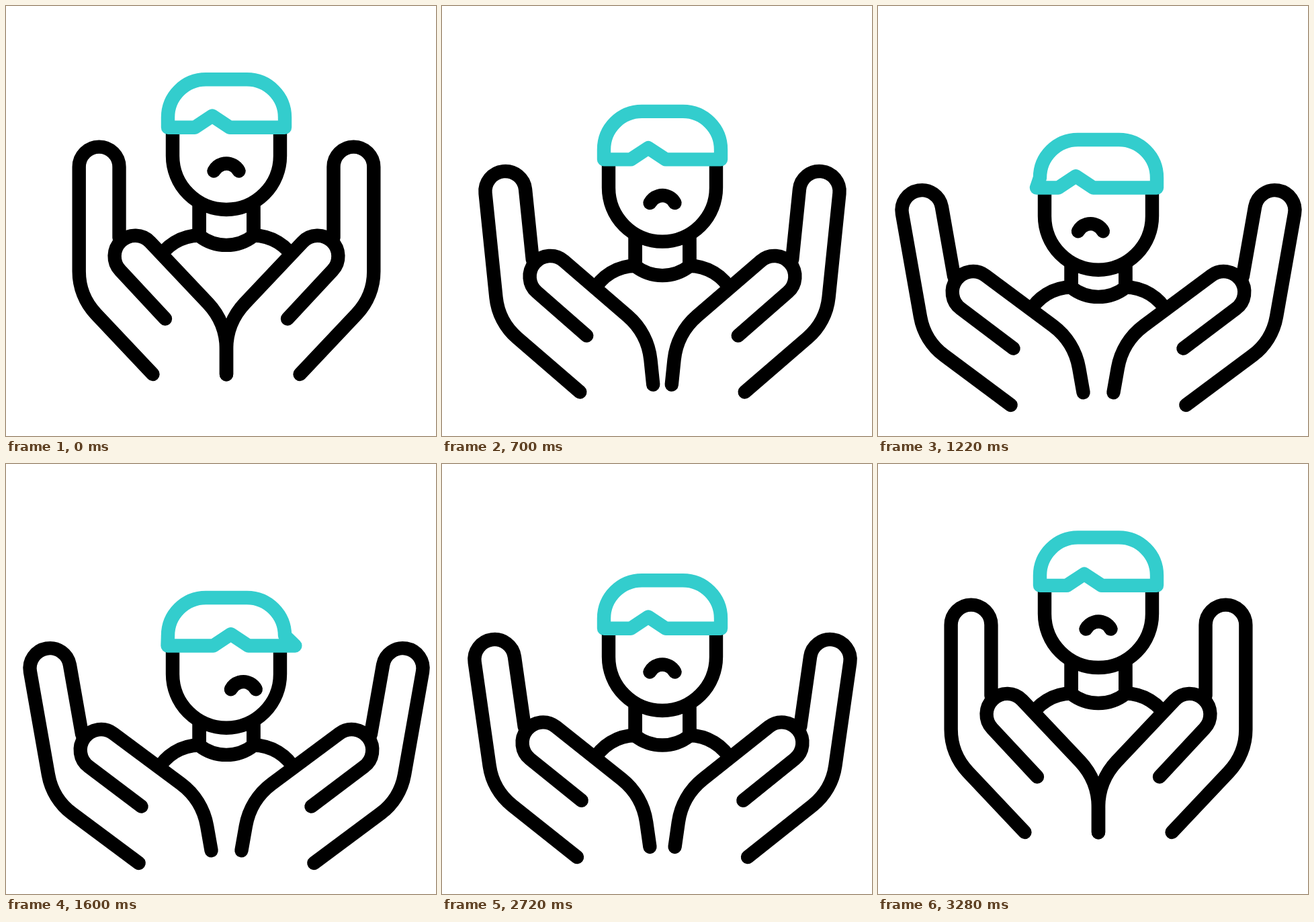
Animation of 640x640 px, one loop 3.62 s. Source, as an HTML page with a canvas:

```html
<!DOCTYPE html>
<html lang="en">
<head>
<meta charset="utf-8">
<title>Caring hands</title>
<style>
  html, body { margin: 0; width: 100%; height: 100%; overflow: hidden; background: #fff; }
  canvas { display: block; width: 100%; height: 100%; }
</style>
</head>
<body>
<canvas id="stage" width="640" height="640"></canvas>
<script>
const ctx = document.getElementById('stage').getContext('2d');
const LOOP = 3620, STEP = 20, MID = 328;
const BLACK = '#000', TEAL = '#33cdcd';
const TAU = Math.PI * 2;

const ease = (t, from, to) => {
  const u = Math.min(1, Math.max(0, (t - from) / (to - from)));
  return (1 - Math.cos(Math.PI * u)) / 2;
};

// Head shake: weights of the left and right poses at evenly spaced keys.
const SHAKE_START = 1100, SHAKE_GAP = 267;
const LEFT_KEYS = [0, 1, 0, 1, 0, 1, 0];
const RIGHT_KEYS = [0, 0, 1, 0, 1, 0, 0];

function keyed(keys, t) {
  const pos = (t - SHAKE_START) / SHAKE_GAP;
  const i = Math.floor(pos);
  if (i < 0 || i >= keys.length - 1) return 0;
  return keys[i] + (keys[i + 1] - keys[i]) * ease(pos, i, i + 1);
}

function pose(t) {
  return {
    open: ease(t, 200, 1100) - ease(t, 2490, 3296),
    nod: ease(t, 580, 1000) - ease(t, 2433, 2800),
    left: keyed(LEFT_KEYS, t),
    right: keyed(RIGHT_KEYS, t)
  };
}

function stroke(build, color = BLACK, cap = 'round') {
  ctx.beginPath();
  build();
  ctx.strokeStyle = color;
  ctx.lineCap = cap;
  ctx.stroke();
}

function fillWhite(build) {
  ctx.beginPath();
  build();
  ctx.fillStyle = '#fff';
  ctx.fill();
}

function mirrored(draw) {
  draw();
  ctx.save();
  ctx.translate(MID * 2, 0);
  ctx.scale(-1, 1);
  draw();
  ctx.restore();
}

function drawBody() {
  mirrored(() => {
    stroke(() => ctx.arc(288, 412.2, 70.7, -Math.PI / 2, -Math.PI * 0.85, true), BLACK, 'butt');
    stroke(() => {
      ctx.moveTo(287.7, 288);
      ctx.lineTo(287.7, 342);
    }, BLACK, 'butt');
  });
  stroke(() => {
    ctx.moveTo(287.7, 288);
    ctx.lineTo(287.7, 341.7);
    ctx.arc(MID, 290.4, 65.5, Math.PI - 0.904, 0.904, true);
    ctx.lineTo(368.3, 288);
  }, BLACK, 'butt');
}

function facePath() {
  ctx.moveTo(248, 181);
  ctx.lineTo(248, 223);
  ctx.arc(MID, 223, 80, Math.PI, 0, true);
  ctx.lineTo(408, 181);
}

function drawHead(p) {
  const turn = p.right - p.left;
  fillWhite(facePath);
  stroke(facePath, BLACK, 'butt');

  const mouthX = MID + 27.5 * turn;
  stroke(() => ctx.arc(mouthX, 255.5, 21, Math.PI + 0.495, -0.495));

  const peak = 307 + 30 * turn, brim = 180.8;
  stroke(() => {
    ctx.moveTo(297.5, 109.3);
    ctx.lineTo(358.5, 109.3);
    ctx.arc(358.5, 165.8, 56.5, -Math.PI / 2, 0);
    ctx.lineTo(415 + 16 * p.right, brim);
    ctx.lineTo(peak + 26, brim);
    ctx.lineTo(peak, 163.6);
    ctx.lineTo(peak - 26, brim);
    ctx.lineTo(241 - 12 * p.left, brim);
    ctx.lineTo(241, 165.8);
    ctx.arc(297.5, 165.8, 56.5, Math.PI, Math.PI * 1.5);
    ctx.closePath();
  }, TEAL);
}

// Diagonal edges of the hand share one slope.
const SLOPE = 1.06, ANGLE = Math.atan(SLOPE);

function palmPath() {
  ctx.moveTo(237, 465.5);
  ctx.arc(192.3, 372.5, 30.7, ANGLE + Math.PI / 2, ANGLE - Math.PI / 2);
  ctx.arcTo(MID, 471.4, MID, 548, 100);
  ctx.lineTo(MID, 548.3);
}

function outerPath() {
  ctx.moveTo(218.5, 548);
  ctx.arcTo(108.7, 548 - 109.8 * SLOPE, 108.7, 239.5, 92);
  ctx.lineTo(108.7, 239.5);
  ctx.arc(138.6, 239.5, 29.9, Math.PI, 0);
  ctx.lineTo(168.5, 345);
}

function posed(open, draw) {
  mirrored(() => {
    ctx.save();
    ctx.translate(471, 690);
    ctx.rotate(-open * TAU / 36);
    ctx.translate(-471, -690);
    draw();
    ctx.restore();
  });
}

function drawHands(open) {
  posed(open, () => fillWhite(palmPath));
  posed(open, () => {
    stroke(outerPath);
    stroke(palmPath);
  });
}

function render(t) {
  const p = pose(t);
  ctx.fillStyle = '#fff';
  ctx.fillRect(0, 0, 640, 640);
  ctx.lineWidth = 20.4;
  ctx.lineJoin = 'round';

  ctx.save();
  ctx.translate(0, 77 * p.open);
  drawBody();
  ctx.translate(0, 12.7 * p.nod);
  drawHead(p);
  ctx.restore();

  drawHands(p.open);
}

const start = performance.now();
function tick() {
  const t = (performance.now() - start) % LOOP;
  render(Math.floor(t / STEP) * STEP);
  requestAnimationFrame(tick);
}
tick();
</script>
</body>
</html>
```
